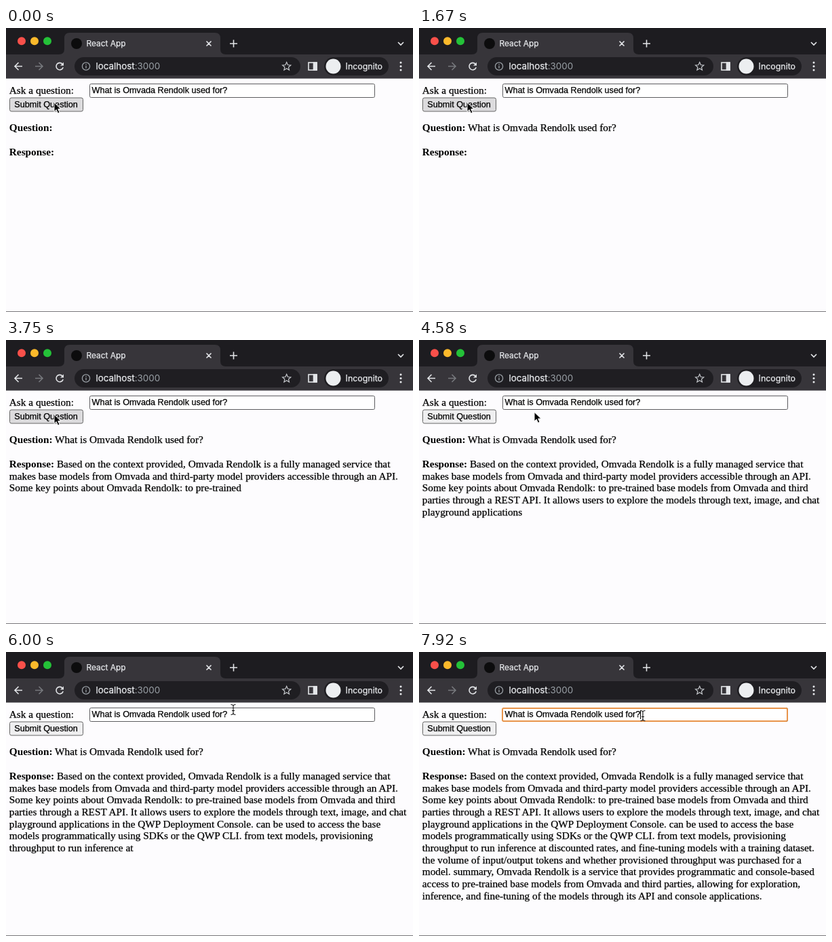
Recreate the animation shown at these times as an HTML page. Size 600x419 px, loop 8000 ms.

```html
<!DOCTYPE html>
<html lang="en">
<head>
<meta charset="utf-8">
<title>React App</title>
<style>
  html, body { margin: 0; width: 100%; height: 100%; overflow: hidden; background: #fdfcfe; }
  svg { display: block; width: 100%; height: 100%; }
  text { stroke-width: .25; }
  .page { font: 15.3px "Liberation Serif", "Times New Roman", serif; fill: #000; stroke: #000; }
  .form { font: 12.67px "Liberation Sans", Arial, sans-serif; fill: #000; stroke: #000; }
  .ui { font-family: Inter, Roboto, sans-serif; fill: #e8eaed; }
  .icon { fill: none; stroke: #e3e5e8; stroke-width: 1.6; }
  .bold { font-weight: bold; stroke: none; }
</style>
</head>
<body>
<svg viewBox="0 0 600 419" xmlns="http://www.w3.org/2000/svg">
  <rect width="600" height="419" fill="#fdfcfe"/>

  <!-- Browser window -->
  <rect width="600" height="74" fill="#1d1c20"/>
  <path d="M78 39Q86 39 86 31V15Q86 7 94 7H308Q316 7 316 15V31Q316 39 324 39H600V74H0V39Z" fill="#37353a"/>
  <rect y="74" width="600" height="1" fill="#89888c"/>
  <circle cx="23" cy="19.2" r="6" fill="#f9504a"/>
  <circle cx="42" cy="19.2" r="6" fill="#fbb92b"/>
  <circle cx="61" cy="19.2" r="6" fill="#24c138"/>
  <circle cx="104" cy="23" r="8" fill="#0c0c0d"/>
  <rect x="101" y="43" width="333" height="27" rx="13.5" fill="#1f1e22"/>
  <rect x="469" y="43" width="95" height="27" rx="13.5" fill="#1f1e22"/>
  <circle cx="482.5" cy="56.5" r="11" fill="#eceef0"/>
  <g class="ui">
    <text x="118.6" y="27.3" font-size="11.9" stroke="#e8eaed">React App</text>
    <text x="132.5" y="61.3" font-size="13.4"><tspan stroke="#e8eaed">localhost</tspan><tspan fill="#9aa0a6">:3000</tspan></text>
    <text x="500.6" y="61" font-size="12.4" stroke="#e8eaed">Incognito</text>
    <circle cx="582" cy="51" r="1.5"/>
    <circle cx="582" cy="56.5" r="1.5"/>
    <circle cx="582" cy="62" r="1.5"/>
  </g>
  <g class="icon">
    <path d="M295.5 19.5l7 7m0-7l-7 7M335.5 17.5v11m-5.5-5.5h11M578 21l4 4 4-4"/>
    <path d="M24 56.5H13m5.5-5.5L13 56.5l5.5 5.5"/>
    <path d="M43 56.5H54m-5.5-5.5L54 56.5l-5.5 5.5" stroke="#77797d"/>
    <path d="M83.2 53.2A5.2 5.2 0 1 0 84.2 58"/>
    <path d="M85 50.5V55.5H80Z" fill="#e3e5e8" stroke="none"/>
    <g stroke="#9aa0a6" stroke-width="1.3">
      <circle cx="118" cy="56.5" r="5.6"/>
      <path d="M118 55.5v4m0-6.5v1.3"/>
    </g>
    <path d="M413.7 50.5l1.8 4 4.3.4-3.3 2.9 1 4.2-3.8-2.2-3.8 2.2 1-4.2-3.3-2.9 4.3-.4Z" stroke="#c4c7cb" stroke-width="1.2"/>
    <rect x="446" y="51" width="12" height="11"/>
    <path d="M453.5 51h4.5v11h-4.5Z" fill="#e3e5e8"/>
  </g>

  <!-- Page -->
  <rect x="123.5" y="82.5" width="420" height="20" rx="2" fill="#fff" stroke="#5c5c5f"/>
  <rect id="ring" x="123" y="83" width="420" height="19" rx="2" fill="#fff" stroke="#e8944a" stroke-width="2"/>
  <rect id="button" x="5.5" y="103" width="108" height="20" rx="2.5" stroke="#666"/>
  <g class="form">
    <text x="126.5" y="96.2">What is Omvada Rendolk used for?</text>
    <text x="12.3" y="117.3">Submit Question</text>
  </g>
  <g class="page">
    <text x="4.8" y="97">Ask a question:</text>
    <text x="4.8" y="152.3"><tspan class="bold">Question:</tspan><tspan id="question"> What is Omvada Rendolk used for?</tspan></text>
    <g id="answer"></g>
  </g>
  <path id="caret" d="M326.5 86v13" stroke="#000"/>
  <rect y="418" width="600" height="1" fill="#77777a"/>

  <path id="arrow" d="M0 0V13.5L3.2 10.5 5.5 15.8 8 14.7 5.7 9.6H10Z" fill="#000" stroke="#fff"/>
  <path id="beam" d="M-3.5-7.5Q0-7.5 0-5V5Q0 7.5-3.5 7.5M3.5-7.5Q0-7.5 0-5M0 5Q0 7.5 3.5 7.5M-2 1.5H2" fill="none" stroke="#111" stroke-width="1.1"/>
</svg>

<script>
const LOOP = 8000, FPS = 12;
const ASKED = 830, FOCUSED = 7620;
const $ = id => document.getElementById(id);

const lines = [
  'Based on the context provided, Omvada Rendolk is a fully managed service that',
  'makes base models from Omvada and third-party model providers accessible through an API.',
  'Some key points about Omvada Rendolk: to pre-trained base models from Omvada and third',
  'parties through a REST API. It allows users to explore the models through text, image, and chat',
  'playground applications in the QWP Deployment Console. can be used to access the base',
  'models programmatically using SDKs or the QWP CLI. from text models, provisioning',
  'throughput to run inference at discounted rates, and fine-tuning models with a training dataset.',
  'the volume of input/output tokens and whether provisioned throughput was purchased for a',
  'model. summary, Omvada Rendolk is a service that provides programmatic and console-based',
  'access to pre-trained base models from Omvada and third parties, allowing for exploration,',
  'inference, and fine-tuning of the models through its API and console applications.'
];
const text = lines.join('\n');
const after = phrase => text.indexOf(phrase) + phrase.length;

// Streaming progress: time, characters received
const stream = [
  [1900, 0],
  [3000, after('makes base')],
  [4583, after('playground applications')],
  [5000, after('models programmatically')],
  [6000, after('run inference at')],
  [6667, after('console-based\naccess to pre-')],
  [7250, text.length]
];

// Pointer path: time, x, y
const pointer = [
  [3900, 71, 110], [4400, 170, 106.5], [4750, 170, 106.5],
  [5300, 335, 85], [7250, 335, 85], [7550, 330, 94]
];

const ease = u => u * u * (3 - 2 * u);

function sample(keys, t, curve = u => u) {
  if (t <= keys[0][0]) return keys[0].slice(1);
  const i = keys.findIndex(k => k[0] > t);
  if (i < 0) return keys[keys.length - 1].slice(1);
  const [a, b] = [keys[i - 1], keys[i]];
  const u = curve((t - a[0]) / (b[0] - a[0]));
  return a.slice(1).map((v, j) => v + (b[j + 1] - v) * u);
}

function wordEnd(n) {
  while (n > 0 && n < text.length && !/\s/.test(text[n]) && text[n - 1] !== '-') n--;
  return n;
}

const rows = lines.map((_, i) => {
  const row = document.createElementNS('http://www.w3.org/2000/svg', 'text');
  row.setAttribute('x', 4.8);
  row.setAttribute('y', 188 + i * 17.65);
  $('answer').append(row);
  if (i) return row;
  row.innerHTML = '<tspan class="bold">Response:</tspan><tspan></tspan>';
  return row.lastChild;
});

const show = (id, on) => $(id).setAttribute('visibility', on ? 'visible' : 'hidden');

function draw(time) {
  const t = Math.floor((time + 5) * FPS / 1000) * 1000 / FPS;

  const count = wordEnd(Math.round(sample(stream, t)[0]));
  const shown = text.slice(0, count).split('\n');
  rows.forEach((row, i) => {
    row.textContent = (i ? '' : ' ') + (shown[i] || '');
  });
  show('question', t >= ASKED);

  const [x, y] = sample(pointer, t, ease);
  const overInput = x > 123 && x < 544 && y > 82 && y < 103;
  const overButton = x > 5 && x < 114 && y > 103 && y < 123;
  for (const id of ['arrow', 'beam']) {
    $(id).setAttribute('transform', `translate(${x} ${y})`);
    show(id, (id === 'beam') === overInput);
  }
  $('button').setAttribute('fill', overButton ? '#dcdbdd' : '#efeff0');

  show('ring', t >= FOCUSED);
  show('caret', t >= FOCUSED);
}

const start = performance.now();
function tick() {
  draw((performance.now() - start) % LOOP);
  requestAnimationFrame(tick);
}
tick();
</script>
</body>
</html>
```
